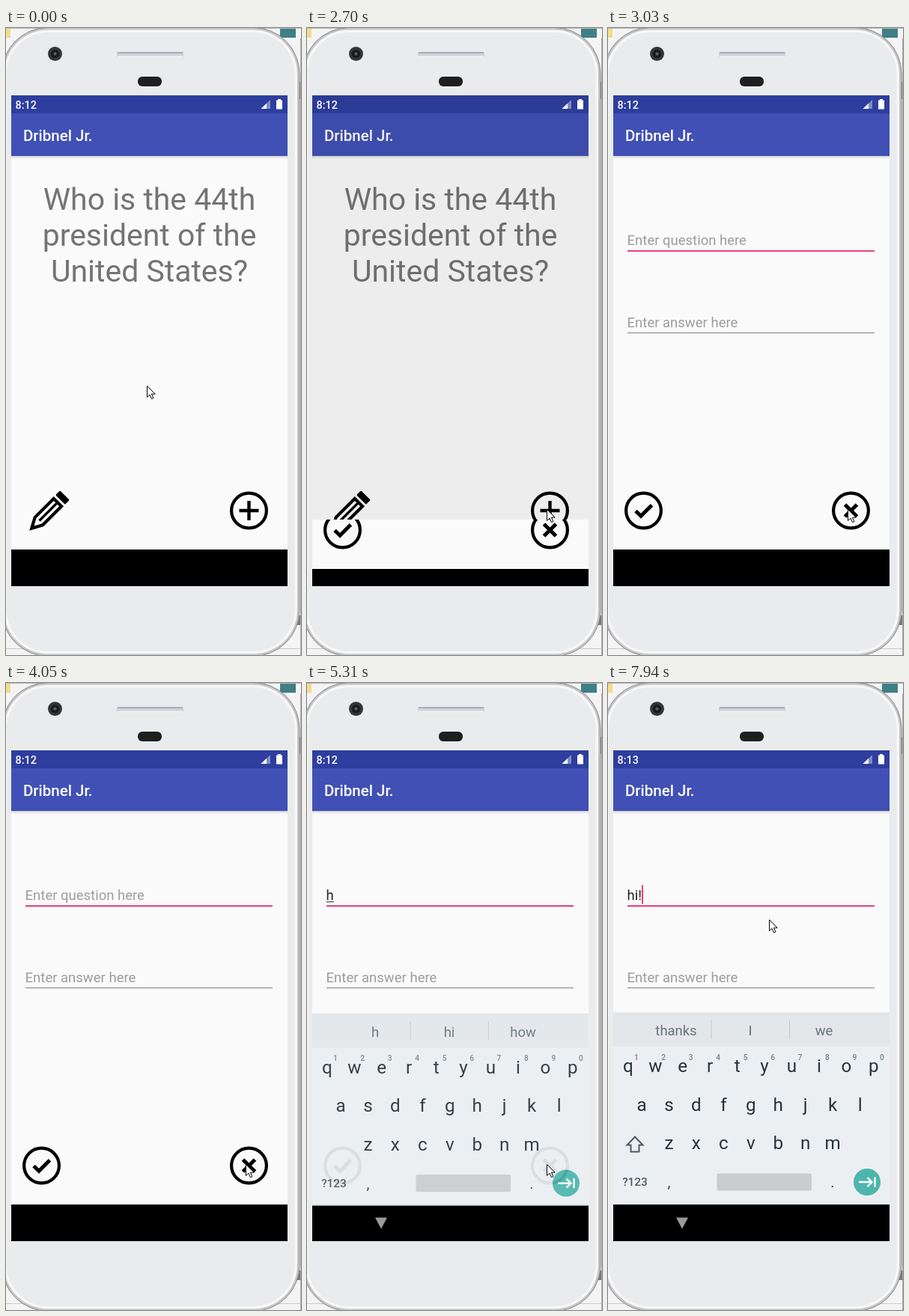
Animation of 394x838 px, one loop 8 s. Source, as an HTML page:

```html
<!DOCTYPE html>
<html lang="en">
<head>
<meta charset="utf-8">
<title>Flash cards</title>
<style>
html, body { margin: 0; width: 100%; height: 100%; overflow: hidden; background: #fff; }
svg { display: block; width: 394px; height: 838px; }
text { font-family: Roboto, sans-serif; white-space: pre; }
</style>
</head>
<body>
<svg id="stage" viewBox="0 0 394 838" xmlns="http://www.w3.org/2000/svg"></svg>
<script>
const rect = (x, y, w, h, fill, extra = '') =>
  `<rect x="${x}" y="${y}" width="${w}" height="${h}" fill="${fill}" ${extra}/>`;
const label = (x, y, size, fill, str, extra = '') =>
  `<text x="${x}" y="${y}" font-size="${size}" fill="${fill}" ${extra}>${str}</text>`;
const line = (d, width, color = '#000', extra = '') =>
  `<path d="${d}" fill="none" stroke="${color}" stroke-width="${width}" ${extra}/>`;
const mid = 'text-anchor="middle"';
const medium = 'font-weight="500"';

const shell = (inset, fill, extra = '') =>
  rect(-6 + inset, -1 + inset, 398.5 - 2 * inset, 841 - 2 * inset, fill, `rx="${62 - inset}" ${extra}`);

function phone() {
  return rect(0, 0, 394, 838, '#f4f4f5')
    + rect(0, 0, 6, 13, '#f3dc8a') + rect(366, 0, 21, 13, '#3f7f86')
    + line('M0 .5H394', 1, '#b9b9b9') + line('M393.5 14V838', 1, '#a9a8ad')
    + line('M0 829.5H394', 1, '#c9c9c9')
    + rect(389, 72, 4, 23, '#77747a') + rect(389, 785, 4, 13, '#77747a')
    + shell(0.5, '#c6c4c6', 'stroke="#8b898b"')
    + shell(3.5, '#f7f7f7') + shell(7, '#e9ebed')
    + rect(148, 32, 89, 7, '#cfd4db', 'rx="1.5"') + rect(149, 32, 87, 2, '#a9aeb6') + rect(149, 37.5, 87, 1.5, '#f4f5f6')
    + '<circle cx="65.5" cy="34.5" r="9.5" fill="#333537"/><circle cx="65.5" cy="34.5" r="5.5" fill="#17191b"/>'
    + '<circle cx="65.5" cy="34.5" r="2.2" fill="#55595d"/>'
    + rect(176, 65, 32, 13, '#1f1f20', 'rx="6"');
}

function windowBase() {
  return rect(7, 90, 369, 24, '#2e3e9e') + rect(7, 114, 369, 57, '#4050b5')
    + rect(7, 171, 369, 526, '#fafafa') + rect(7, 171, 369, 4, 'url(#shade)')
    + rect(7, 697, 369, 80, '#000')
    + label(23, 151, 20.48, '#fff', 'Dribnel Jr.', medium);
}

const ring = (cx, inner) => `<g transform="translate(${cx} 645)">
  <circle r="23.4" fill="none" stroke="#000" stroke-width="4.2"/>${inner}</g>`;

function pencil() {
  return '<g transform="translate(32.5 670.5) rotate(-45)">'
    + rect(56.5, -9, 8.5, 18, '#000', 'rx="1.5"')
    + line('M2.5 0L16 -7.3H51.5V7.3H16Z', 4.2)
    + line('M17 0H50', 3.4) + '<path d="M0 0L8 -5V5Z"/></g>';
}

function cardScreen() {
  const rows = ['Who is the 44th', 'president of the', 'United States?'];
  return windowBase()
    + rows.map((s, i) => label(191.5, 242.5 + 48 * i, 40.96, '#747474', s, mid)).join('')
    + pencil() + ring(324.5, line('M-13 0H13M0 -13V13', 4.4));
}

function formScreen() {
  return windowBase()
    + label(25.6, 290, 18.5, '#9d9d9d', 'Enter question here', 'id="hint"')
    + label(25.6, 290, 18.5, '#222', '', 'id="entry"')
    + line('', 1, '#333', 'id="compose"')
    + rect(26, 297, 330, 2, '#ec407a')
    + rect(26, 270, 2, 25, '#ec407a', 'id="caret"')
    + label(25.6, 400, 18.5, '#9d9d9d', 'Enter answer here')
    + rect(26, 407, 330, 1, '#808080')
    + ring(47.5, line('M-10.5 0.5L-3.5 7.2L11 -7.2', 5))
    + ring(324.5, line('M-8 -8L8 8M8 -8L-8 8', 5));
}

function keyboard() {
  const rows = [['qwertyuiop', 26.8, 520], ['asdfghjkl', 45, 571.5], ['zxcvbnm', 81.4, 623]];
  let s = rect(7, 440, 369, 257, '#eceff1') + rect(7, 440, 369, 46, '#e4e7e9')
    + rect(137.5, 451, 1, 25, '#c3c9cc') + rect(242, 451, 1, 25, '#c3c9cc');
  [91, 190, 288.5].forEach((x, i) => s += label(x, 471, 18.45, '#66747a', '', `${mid} id="word${i}"`));
  for (const [keys, x, y] of rows)
    [...keys].forEach((k, i) => s += label(x + 36.45 * i, y, 24.2, '#263238', k, mid));
  for (let i = 0; i < 10; i++)
    s += label(37.8 + 36.45 * i, 503.5, 10.2, '#77838a', (i + 1) % 10, mid + ' ' + medium);
  return s + line('M36 606.5L46.5 617.5H41.5V626.5H30.5V617.5H25.5Z', 2, '#4f5b61', 'id="shift"')
    + label(36, 672, 15.4, '#4f5b61', '?123', mid + ' ' + medium)
    + label(81.5, 674, 20, '#37474f', ',', mid) + label(300, 674, 20, '#37474f', '.', mid)
    + rect(145.5, 655.5, 126.5, 23, '#c9cdcf', 'rx="2"')
    + '<circle cx="346" cy="667" r="18" fill="#4db6ac"/>'
    + line('M335 667H352M346.5 661L352.5 667L346.5 673M356.5 660.5V673.5', 2.3, '#fff');
}

const stage = document.getElementById('stage');
stage.innerHTML = `<defs>
  <linearGradient id="shade" x2="0" y2="1"><stop stop-color="#000" stop-opacity=".16"/><stop offset="1" stop-color="#000" stop-opacity="0"/></linearGradient>
  <clipPath id="glass">${rect(7, 90, 369, 656, '#000')}</clipPath>
  <clipPath id="reveal">${rect(7, 90, 369, 656, '#000', 'id="revealBox"')}</clipPath></defs>`
  + phone()
  + '<g clip-path="url(#glass)"><g id="card">' + cardScreen() + '</g>'
  + rect(7, 90, 369, 656, '#000', 'id="dim"')
  + '<g id="formClip" clip-path="url(#reveal)"><g id="form">' + formScreen() + '</g></g>'
  + '<g id="keys">' + keyboard() + '</g>'
  + '<path id="back" d="M91 714.5H107L99 729.5Z" fill="#9a9a9a"/></g>'
  + label(12.6, 107.7, 14.34, '#fff', '', medium + ' id="clock"')
  + '<path d="M340.5 108L353 96V108Z" fill="#fff" opacity=".4"/><path d="M340.5 108L348 100.8V108Z" fill="#fff"/>'
  + '<path d="M363 95H367V96.5H369V108.5H361V96.5H363Z" fill="#fff"/>'
  + '<path id="mouse" d="M.5 .5V15.5L4 12.2L6.5 17.7L8.9 16.6L6.4 11.2H11.2Z" fill="#fff" stroke="#000" stroke-width="1"/>';

const el = {};
stage.querySelectorAll('[id]').forEach(n => el[n.id] = n);
const set = (n, name, v) => n.setAttribute(name, v);
const show = (n, on) => set(n, 'visibility', on ? 'visible' : 'hidden');

// Last row whose time has passed.
const hold = (rows, t) => rows.reduce((best, r) => r[0] <= t ? r : best, rows[0]);

const mousePath = [
  [0, 188, 478], [710, 193, 485], [790, 211, 506], [880, 240, 538], [960, 274, 573],
  [1040, 308, 606], [1130, 336, 630], [1210, 350, 642], [1290, 347, 645], [1380, 338, 645],
  [1460, 330, 645], [1540, 324, 645], [1610, 320, 643], [5400, 312, 618], [5470, 288, 540],
  [5560, 254, 440], [5640, 229, 363], [5750, 218, 325], [5840, 215, 316]
];
// time, form offset, reveal top, card shift, dim
const slide = [
  [2700, 26, 657, 0, .05], [2790, 12, 180, -6, .08], [2870, 3, 93, -12, .1],
  [2940, 1, 91, -13, .1], [3030, 0, 90, 0, 0]
];
const typed = [[0, '', 26], [5150, 'h', 36.5], [6510, 'hi', 41], [6930, 'hi!', 45]];
const caretOn = [[2700, 1], [3030, 0], [3540, 1], [4050, 0], [5060, 1], [5150, 0],
  [5560, 1], [6010, 0], [6510, 1], [7490, 0], [7940, 1]];
const words = [[0, 'h', 'hi', 'how'], [6510, 'hi', 'his', 'him'], [6930, 'thanks', 'I', 'we']];

function draw(t) {
  const [, mx, my] = hold(mousePath, t);
  set(el.mouse, 'transform', `translate(${mx} ${my})`);

  const open = t >= 2700;
  const [, dy, top, shift, dim] = hold(slide, t);
  show(el.formClip, open);
  set(el.form, 'transform', `translate(0 ${dy})`);
  set(el.revealBox, 'y', top);
  set(el.card, 'transform', `translate(0 ${open ? shift : 0})`);
  set(el.dim, 'opacity', open ? dim : 0);

  const [, str, cx] = hold(typed, t);
  el.entry.textContent = str;
  set(el.hint, 'opacity', str ? 0 : 1);
  set(el.compose, 'd', str && str !== 'hi!' ? `M26 292.5H${cx - 0.5}` : '');
  set(el.caret, 'x', cx);
  set(el.caret, 'opacity', hold(caretOn, t)[1]);

  const rising = t < 5400;
  show(el.keys, t >= 5310);
  set(el.keys, 'opacity', rising ? .93 : 1);
  set(el.keys, 'transform', `translate(0 ${rising ? 1.6 : 0})`);
  hold(words, t).slice(1).forEach((w, i) => el['word' + i].textContent = w);
  set(el.shift, 'opacity', t >= 6930 ? 1 : 0);
  set(el.back, 'opacity', t < 5060 ? 0 : t < 5150 ? .5 : 1);
  el.clock.textContent = t < 7150 ? '8:12' : '8:13';
}

const start = performance.now();
function tick() {
  draw((performance.now() - start) % 8000);
  requestAnimationFrame(tick);
}
tick();
</script>
</body>
</html>
```
